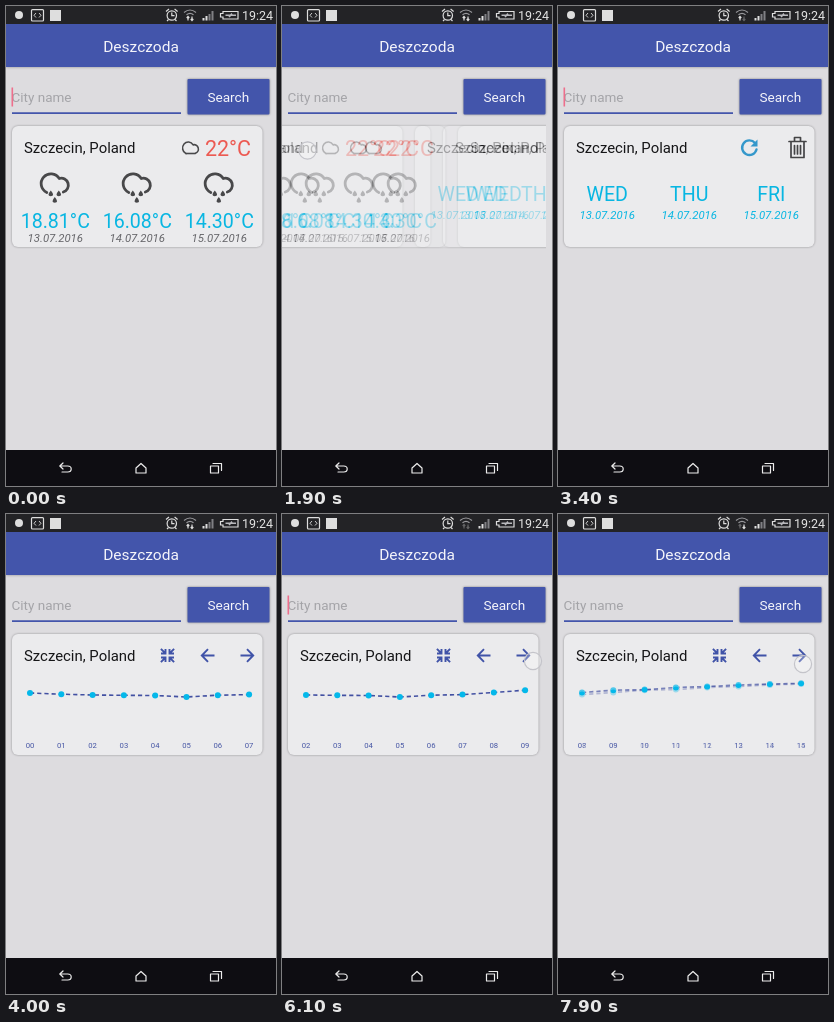
These frames come from a looping animation (270x480 px, 8 s). An HTML page:

```html
<!DOCTYPE html>
<html lang="en">
<head>
<meta charset="utf-8">
<title>Weather cards</title>
<style>
  html, body { margin: 0; width: 100%; height: 100%; overflow: hidden; background: #dddcdf; }
  svg { display: block; width: 270px; height: 480px; font-family: Roboto, "Open Sans", sans-serif; }
  .mid { text-anchor: middle; }
  .line { fill: none; stroke-linecap: round; stroke-linejoin: round; }
  .blue { stroke: #4053a8; stroke-width: 1.9; stroke-linecap: butt; stroke-linejoin: miter; }
  .cyan { fill: #08b6e2; font-size: 19.6px; }
  .date { font-size: 11.4px; font-style: italic; }
  .hour { fill: #4555a4; font-size: 7.7px; }
  .city { fill: #161618; font-size: 14.9px; }
  .card { fill: #ebebed; filter: drop-shadow(0 .8px 1.2px rgba(0, 0, 0, .34)); }
</style>
</head>
<body>
<svg viewBox="0 0 270 480">
  <defs>
    <clipPath id="pager"><rect y="112" width="264" height="136"/></clipPath>
    <path id="cloud" class="line" d="M-8 8A9.8 9.8 0 1 1 4.500 -6A6.900 6.900 0 1 1 8.500 7.500"/>
    <g id="rain">
      <use href="#cloud" y="-2.5" stroke="#48484a" stroke-width="2.800"/>
      <path fill="#48484a" d="M-4 3.500q4.600 5.400 0 5.800q-4.600 -.4 0 -5.800M4 3.500q4.600 5.400 0 5.800q-4.600 -.4 0 -5.800M0 10q4.600 5.400 0 5.800q-4.600 -.4 0 -5.800"/>
    </g>
    <path id="arrow" class="line blue" d="M-6.500 0H6M0 -6.300L6.200 0L0 6.300"/>
    <path id="inward" class="line blue" d="M2 6.500V2H6.500M2 2L6.600 6.600"/>
  </defs>

  <rect width="270" height="480" fill="#dddcdf"/>
  <g id="layers" clip-path="url(#pager)"></g>

  <rect y="18" width="270" height="43" fill="#4355ab" style="filter:drop-shadow(0 .8px 1.500px rgba(0,0,0,.35))"/>
  <text class="mid" x="135" y="46" font-size="15.500" fill="#f4f4fa">Deszczoda</text>

  <text x="5.500" y="95.700" font-size="13.500" fill="#a4a4a8">City name</text>
  <path d="M6 107.200H175" stroke="#4355ab" stroke-width="1.700"/>
  <rect id="caret" x="5.500" y="81.500" width="1.600" height="19" fill="#ee6f8c"/>
  <rect x="181.500" y="73" width="82" height="35.500" rx="1" fill="#4355ab" style="filter:drop-shadow(0 .5px 1px rgba(0,0,0,.4))"/>
  <text class="mid" x="222.300" y="95.900" font-size="13.600" fill="#f4f4fa">Search</text>

  <circle id="finger" r="8.600" fill="#fff" fill-opacity=".25" stroke="#c4c4ca" stroke-width="1.200"/>

  <rect width="270" height="18" fill="#232326"/>
  <g stroke="#dedede" fill="none" stroke-width="1.200">
    <circle cx="13" cy="9" r="4" fill="#dedede" stroke="none"/>
    <rect x="25.500" y="3.600" width="12" height="11.400" rx="1"/>
    <path d="M30 7L28 9.300L30 11.500M33 7L35 9.300L33 11.500" stroke-width=".9"/>
    <rect x="44" y="4" width="11" height="11" fill="#dedede" stroke="none"/>
    <circle cx="165.800" cy="9.500" r="4.700"/>
    <path d="M165.800 6.500V9.700H168.500M160 5.500L163 3M168.600 3L171.600 5.500M162.500 13.500L161 15M169 13.500L170.500 15"/>
    <path d="M178 6.500Q184 1.500 190 6.500M180.500 8.800Q184 5.800 187.500 8.800" stroke="#98989c"/>
    <path id="upload" d="M182 14.500V10.500M180.700 12L182 10.500L183.300 12"/>
    <path id="download" d="M186 10.500V14.500M184.700 13L186 14.500L187.300 13"/>
    <path d="M197.500 12V14.500M200.500 10V14.500" stroke-width="2"/>
    <path d="M203.500 8V14.500M206.500 5V14.500" stroke="#808084" stroke-width="2"/>
    <path d="M217 5.500H232V13H217V11H214.500V7.500H217Z"/>
    <path d="M219.500 9.300H230M223 11L226 7.600" stroke="#b8b8bc" stroke-width="1.600"/>
  </g>
  <text x="236" y="13.700" font-size="12.500" fill="#e4e4e4">19:24</text>

  <rect y="444" width="270" height="36" fill="#0e0d12"/>
  <g class="line" stroke="#ececec" stroke-width="1.200">
    <path d="M57 457L53.800 460L57 463M54.300 460H61.700Q65.200 460 65.200 463T61.700 466H56"/>
    <path d="M130 462L135 457.500L140 462V467H130Z"/>
    <path d="M204.500 460H212.500V467H204.500ZM207 457.500H215.500V464.500"/>
  </g>
</svg>

<script>
  const LOOP = 8000, FRAME = 100, PITCH = 263, LAG = 33;
  const COLUMNS = [49.3, 131.3, 213.3];
  const DATES = ["13.07.2016", "14.07.2016", "15.07.2016"];
  const HEIGHTS = [179, 180.2, 181, 181.3, 181.5, 183, 181.2, 180.6, 178.5,
                   176.2, 175.6, 173.5, 172.5, 171, 170, 169.3];
  const SWIPE = [[1650, 0], [1800, -70], [1834, -93], [1867, -108], [1900, -136],
                 [2000, -215], [2100, -250], [2200, -PITCH]];
  const FADE = [[3400, 0], [3800, 1]];
  const DRAG = [[1600, 158], [1700, 118], [1900, 25.5], [1999, 8]];
  const SHIFTS = [5020, 5720, 6220, 6620, 7020, 7320, 7620, 7850];
  // from, to, x, y
  const TAPS = [[3200, 3400, 52, 198], [5000, 5300, 254, 152], [5600, 5800, 252, 149],
                [6100, 6300, 251, 147], [6500, 6700, 250, 145], [6900, 7100, 248, 144],
                [7200, 7400, 247, 146], [7500, 7700, 246, 148], [7800, 8000, 245, 150]];

  const byId = id => document.getElementById(id);
  const two = n => String(n).padStart(2, "0");
  const plotX = i => 24 + i * 31.3;

  function tween(keys, t) {
    if (t <= keys[0][0]) return keys[0][1];
    for (let i = 1; i < keys.length; i++) {
      const [t0, a] = keys[i - 1], [t1, b] = keys[i];
      if (t <= t1) return a + (b - a) * (t - t0) / (t1 - t0);
    }
    return keys[keys.length - 1][1];
  }

  const label = (x, y, cls, text, extra = "") =>
    `<text class="mid ${cls}" x="${x}" y="${y}" ${extra}>${text}</text>`;
  const columns = draw => COLUMNS.map(draw).join("");
  const base = `<rect class="card" x="6" y="120" width="250.5" height="121" rx="6"/>
    <text class="city" x="18" y="147">Szczecin, Poland</text>`;

  const nowPage = base +
    `<use href="#cloud" transform="translate(184.500 142.600) scale(.58 .62)" stroke="#48484a" stroke-width="2.700"/>
     <path d="M179.800 147.500H189.600" stroke="#48484a" stroke-width="1.600"/>` +
    label(222, 150, "", "22°C", 'font-size="21.500" fill="#ec5a52"') +
    columns((x, i) => `<use href="#rain" x="${x - 0.5}" y="181"/>` +
      label(x, 221.6, "cyan", ["18.81°C", "16.08°C", "14.30°C"][i]) +
      label(x, 236, "date", DATES[i], 'fill="#66666a"'));

  const daysPage =
    `<path class="line" d="M197 137A7.300 7.300 0 1 0 198.500 143.500" stroke="#3598cb" stroke-width="2.400"/>
     <path d="M199.500 133.500V140.500H192.500Z" fill="#3598cb"/>
     <path class="line" d="M231 135.500H248M236.500 135V131.500H242.500V135M233 136V151.500H246V136M236.500 139.500V148M239.500 139.500V148M242.500 139.500V148" stroke="#444446" stroke-width="1.700"/>` +
    columns((x, i) => label(x, 195, "cyan", ["WED", "THU", "FRI"][i]) +
      label(x, 213, "date", DATES[i], 'fill="#08b6e2"'));

  const chartPage =
    [0, 90, 180, 270].map(a => `<use href="#inward" transform="translate(161.500 141.500) rotate(${a})"/>`).join("") +
    `<use href="#arrow" transform="translate(202 141.500) scale(-1 1)"/>
     <use href="#arrow" x="241" y="141.500"/>
     <polyline fill="none" stroke="#4250a2" stroke-width="1.600" stroke-dasharray="4.200 3"/>` +
    HEIGHTS.slice(0, 8).map((_, i) =>
      `<circle cx="${plotX(i)}" r="3" fill="#04b8ea"/>` + label(plotX(i), 234.3, "hour", "")).join("");

  // Stacked opaque copies average three moments in time.
  function makeLayer(n) {
    const g = document.createElementNS("http://www.w3.org/2000/svg", "g");
    g.setAttribute("opacity", 1 / (n + 1));
    g.innerHTML = `<rect y="112" width="264" height="136" fill="#dddcdf"/>
      <g class="track"><g>${nowPage}</g>
      <g transform="translate(${PITCH} 0)">${base}<g class="days">${daysPage}</g><g class="chart">${chartPage}</g></g></g>`;
    byId("layers").append(g);
    const one = s => g.querySelector(s);
    return {
      lag: (2 - n) * LAG, start: -1,
      track: one(".track"), days: one(".days"), chart: one(".chart"), line: one("polyline"),
      dots: g.querySelectorAll(".chart circle"), hours: g.querySelectorAll(".hour")
    };
  }
  const layers = [0, 1, 2].map(makeLayer);

  function plot(layer, start) {
    if (layer.start === start) return;
    layer.start = start;
    const ys = HEIGHTS.slice(start, start + 8);
    layer.line.setAttribute("points", ys.map((y, i) => `${plotX(i)},${y}`).join(" "));
    ys.forEach((y, i) => {
      layer.dots[i].setAttribute("cy", y);
      layer.hours[i].textContent = two(start + i);
    });
  }

  function drawLayer(layer, time) {
    const t = Math.max(0, time - layer.lag);
    const shown = tween(FADE, t);
    layer.track.setAttribute("transform", `translate(${tween(SWIPE, t)} 0)`);
    layer.days.setAttribute("opacity", 1 - shown);
    layer.chart.setAttribute("opacity", shown);
    plot(layer, SHIFTS.filter(s => s <= t).length);
  }

  function drawFinger(t) {
    const tap = TAPS.find(([from, to]) => t >= from && t < to);
    const dragging = t >= 1600 && t < 2000;
    const finger = byId("finger");
    finger.setAttribute("visibility", tap || dragging ? "visible" : "hidden");
    finger.setAttribute("cx", tap ? tap[2] : tween(DRAG, t));
    finger.setAttribute("cy", tap ? tap[3] : 144.5);
  }

  function draw(now) {
    const t = Math.floor((now % LOOP) / FRAME) * FRAME;
    layers.forEach(layer => drawLayer(layer, t));
    drawFinger(t);
    byId("caret").setAttribute("visibility", t % 1010 < 505 ? "visible" : "hidden");
    byId("upload").setAttribute("opacity", t % 1700 < 900 ? 1 : .35);
    byId("download").setAttribute("opacity", t % 1300 < 700 ? 1 : .35);
  }

  const began = performance.now();
  function tick() {
    draw(performance.now() - began);
    requestAnimationFrame(tick);
  }
  tick();
</script>
</body>
</html>
```
